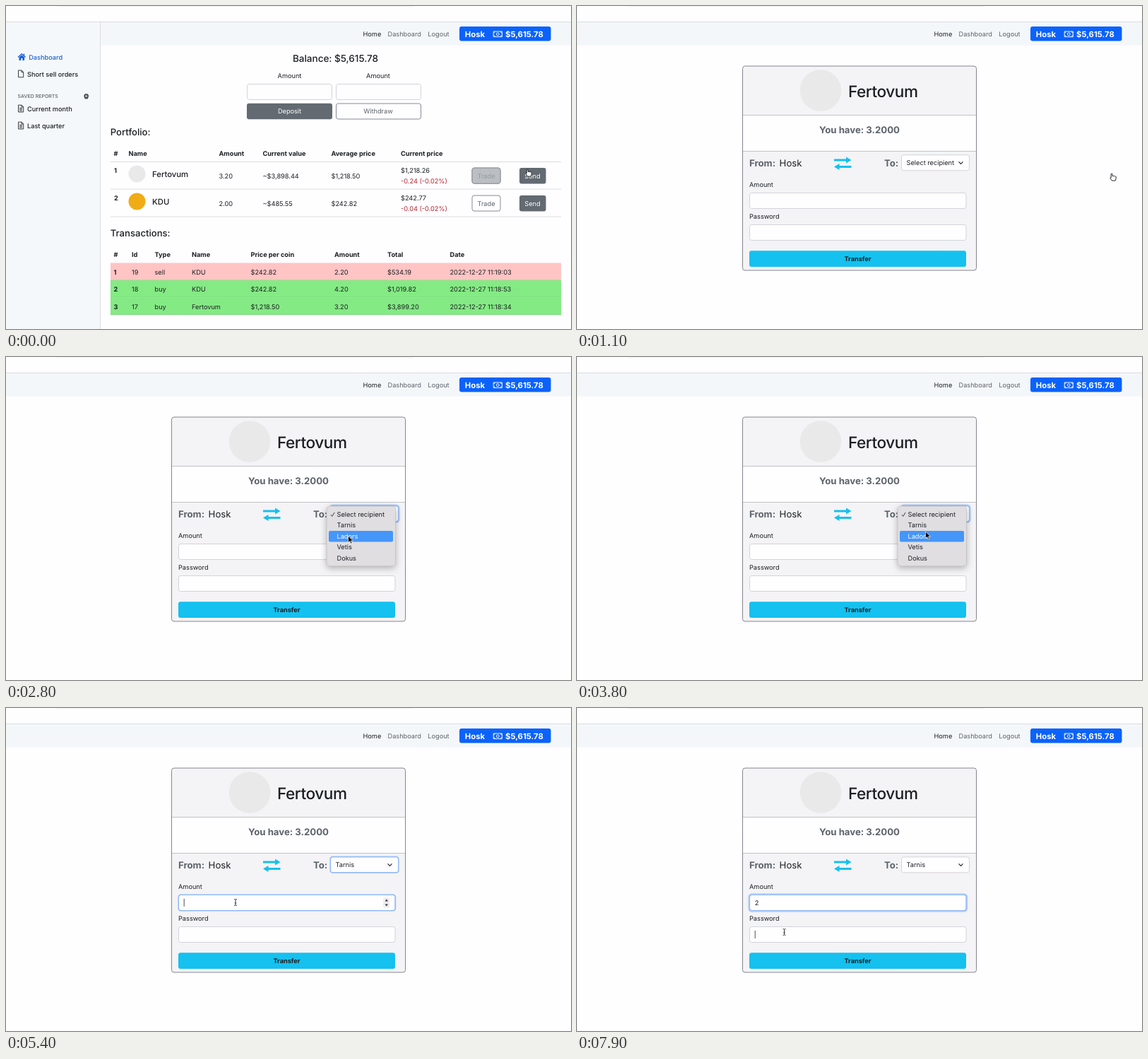
Recreate the animation shown at these times as an HTML page. Size 800 px wide and 457 px high, loop 8000 ms.

```html
<!DOCTYPE html>
<html lang="en">
<head>
<meta charset="utf-8">
<title>Wallet transfer</title>
<style>
  html, body { margin: 0; width: 800px; height: 457px; overflow: hidden; background: #fefdff; }
  svg { display: block; font: 9.2px Inter, sans-serif; fill: #1c1f23; text-rendering: geometricPrecision; }
  text { white-space: pre; }
  .b { font-weight: 700; }
  .m { font-weight: 500; }
  .mid { text-anchor: middle; }
  .h { font-size: 13.5px; font-weight: 500; }
  .h2 { font-size: 13.1px; font-weight: 500; }
  .coin { font-size: 11.3px; font-weight: 500; }
  .title { font-size: 22.6px; font-weight: 500; letter-spacing: -.02em; }
  .big { font-size: 13.2px; }
  .badge { font-size: 11.3px; font-weight: 700; }
  .tiny { font-size: 7px; font-weight: 500; }
  .status { font-size: 7.3px; }
  .grey { fill: #5c636a; }
  .white { fill: #fff; }
  .blue { fill: #1a62d4; }
  .red { fill: #b3242c; }
  .line { fill: none; stroke: #dcdde0; }
  .field { fill: #fefdff; stroke: #d3d5d9; }
  .solid { fill: #636a71; }
  .dark { fill: #495056; }
  .outline { fill: #fefdff; stroke: #858b91; }
  .icon { fill: none; stroke: #23272b; stroke-width: .9; }
  .ring { fill: none; stroke: #0d6efd; stroke-opacity: .28; stroke-width: 2.4; }
  .edge { fill: none; stroke: #8fb9f8; }
  .caret { fill: none; stroke: #222; stroke-width: .8; }
</style>
</head>
<body>
<svg id="stage" width="800" height="457" viewBox="0 0 800 457"></svg>
<script>
const LOOP = 8000, STEP = 100;
const user = 'Hosk', coinA = 'Fertovum', coinB = 'KDU';
const people = ['Tarnis', 'Ladors', 'Vetis', 'Dokus'];

const text = (x, y, s, c = '') => `<text x="${x}" y="${y}" class="${c}">${s}</text>`;
const box = (x, y, w, h, c, r = 3, more = '') =>
  `<rect x="${x}" y="${y}" width="${w}" height="${h}" rx="${r}" class="${c}" ${more}/>`;
const path = (d, c, more = '') => `<path d="${d}" class="${c}" ${more}/>`;
const disc = (x, y, r, fill) => `<circle cx="${x}" cy="${y}" r="${r}" fill="${fill}"/>`;
// Visible only inside the given time windows, "from-to" in ms
const at = (spans, s) => `<g data-on="${spans}">${s}</g>`;
const row = (xs, y, cells, c = '') => cells.map((s, i) => text(xs[i], y, s, c)).join('');

const file = (y, lined) => path(
  `M17.5 ${y}h4.6l2.6 2.6v7.2h-7.2zM22 ${y}v2.7h2.7` +
  (lined ? `M19 ${y + 4.2}h4M19 ${y + 6}h4M19 ${y + 7.8}h4` : ''), 'icon');

function header() {
  return path('M72 0H576', 'line', 'stroke-opacity=".8"') +
    box(0, 23, 800, 32.5, '', 0, 'fill="#f4f7fa"') + path('M0 22.5H800', 'line') +
    text(505.5, 43.3, 'Home') + text(540.5, 43.3, 'Dashboard', 'grey') +
    text(597.3, 43.3, 'Logout', 'grey') +
    box(642, 29, 129.5, 20.5, '', 3, 'fill="#0b62fb"') +
    text(649.8, 44, user, 'badge white') + text(707, 44, '$5,615.78', 'badge white') +
    path('M690.2 36h12.2v7.6h-12.2zM690.2 38.2q2 0 2-2.2M702.4 38.2q-2 0-2-2.2M690.2 41.4q2 0 2 2.2M702.4 41.4q-2 0-2 2.2',
      '', 'fill="none" stroke="#fff" stroke-width=".9"') +
    '<circle cx="696.3" cy="39.8" r="1.9" fill="none" stroke="#fff"/>';
}

function sidebar() {
  return box(0, 23, 133, 434, '', 0, 'fill="#f5f8fa"') + path('M133.5 23V457', 'line') +
    path('M17 72.4L22.3 67.6L27.6 72.4', '', 'fill="none" stroke="#1a62d4" stroke-width="1.4"') +
    path('M18.5 72.6L22.3 69.2L26.1 72.6V77H23.4V74H21.2V77H18.5zM24.8 67.5h1.4v3h-1.4z', 'blue') +
    text(32.2, 76, 'Dashboard', 'm blue') +
    file(91, false) + text(30, 100.2, 'Short sell orders', 'm') +
    text(16.6, 130, 'SAVED REPORTS', 'tiny grey') +
    '<circle cx="113.7" cy="127.4" r="2.5" class="icon" style="stroke-width:1.3"/>' +
    '<circle cx="113.7" cy="127.4" r="1" class="icon" style="stroke-width:.6"/>' +
    path('M111.2 130.9h5', 'icon') +
    file(140.2, true) + text(30, 149.2, 'Current month', 'm') +
    file(164.2, true) + text(30, 173, 'Last quarter', 'm');
}

function holding(y, n, coin, fill, cells, price, change) {
  return text(153, y + 15.5, n, 'b') + disc(185.5, y + 17.2, 12, fill) +
    text(207, y + 21.6, coin, 'coin') + row([301.5, 363.5, 460.5], y + 23.5, cells) +
    text(559, y + 15.7, price) + text(559, y + 30.2, change, 'red') +
    box(660, y + 8.8, 40, 22, 'outline') + text(680, y + 23.4, 'Trade', 'mid grey') +
    box(727, y + 8.6, 37.5, 22.6, 'solid') + text(745.5, y + 23.4, 'Send', 'mid white') +
    path(`M148 ${y + 38.8}H786`, 'line');
}

function dashboard() {
  const cols = [152.6, 178, 210.5, 263, 346.5, 465, 540, 628.5];
  const deals = [
    ['1', '19', 'sell', coinB, '$242.82', '2.20', '$534.19', '2022-12-27 11:19:03'],
    ['2', '18', 'buy', coinB, '$242.82', '4.20', '$1,019.82', '2022-12-27 11:18:53'],
    ['3', '17', 'buy', coinA, '$1,218.50', '3.20', '$3,899.20', '2022-12-27 11:18:34']
  ];
  return sidebar() + text(466.5, 79, 'Balance: $5,615.78', 'h mid') +
    text(401.5, 102.3, 'Amount', 'mid') + text(527, 102.3, 'Amount', 'mid') +
    box(341.5, 110.5, 120, 22, 'field') + box(467.5, 110.5, 120, 22, 'field') +
    box(341, 137.7, 121, 22.6, 'solid') + text(401.5, 152.4, 'Deposit', 'mid white') +
    box(467.5, 138, 120, 22, 'outline') + text(527, 152.4, 'Withdraw', 'mid grey') +
    text(147.8, 183.2, 'Portfolio:', 'h2') +
    row([152.6, 173.5, 301.5, 363.5, 460.5, 559], 212,
      ['#', 'Name', 'Amount', 'Current value', 'Average price', 'Current price'], 'b') +
    path('M148 220.5H786', 'line') +
    holding(220.3, '1', coinA, '#e9e9ea', ['3.20', '~$3,898.44', '$1,218.50'], '$1,218.26', '-0.24 (-0.02%)') +
    holding(259.3, '2', coinB, '#f0ac16', ['2.00', '~$485.55', '$242.82'], '$242.77', '-0.04 (-0.02%)') +
    at('0-100', box(660, 229.1, 40, 22, '', 3, 'fill="#bbbfc3" stroke="#8b9197"') +
      text(680, 243.7, 'Trade', 'mid', ) .replace('class="mid"', 'class="mid" fill="#959a9f"')) +
    at('100-1000', box(727, 228.9, 37.5, 22.6, 'dark') + text(745.5, 243.7, 'Send', 'mid white')) +
    text(147.8, 326.4, 'Transactions:', 'h2') +
    row(cols, 355, ['#', 'Id', 'Type', 'Name', 'Price per coin', 'Amount', 'Total', 'Date'], 'b') +
    deals.map((d, i) => {
      const y = 363.5 + i * 24.5;
      return box(148, y, 638, 24.5, '', 0, `fill="${i ? '#84ea84' : '#ffc4c4'}"`) +
        path(`M148 ${y + 24}H786`, '', `stroke="${i ? '#79d67b' : '#e3b9b4'}" stroke-width=".8"`) +
        text(cols[0], y + 16, d[0], 'b') + row(cols.slice(1), y + 16, d.slice(1));
    }).join('') +
    at('300-1000', path('M0 444.5H117.5Q121 444.5 121 448V457H0Z', '',
      'fill="#dfe1e4" stroke="#b9bbbe" stroke-width=".8"') +
      text(3, 453.6, 'tidalhill:4100/unit/3058/dispatch', 'status'));
}

function focus(y, x, w, full, half) {
  return at(full, box(x - 1, y - 1, w + 2, 24, 'ring', 4) + box(x, y, w, 22, 'edge')) +
    at(half, box(x - .5, y - .5, w + 1, 23, 'ring', 3.5, 'style="stroke-width:1.6"') + box(x, y, w, 22, 'edge'));
}

function menu() {
  const spans = ['2200-2400', '2400-2500 4000-4200', '2500-4000'];
  const items = ['Select recipient', ...people];
  return box(454, 211, 97.5, 84.8, '', 4.5,
    'fill="#e0dee1" stroke="#bab9bc" stroke-width=".6" style="filter:drop-shadow(0 3px 5px #0004)"') +
    items.map((s, i) => text(468.5, 225.8 + i * 15.5, s)).join('') +
    path('M460 223.2l1.7 2.2 3.4-5.4', 'icon') +
    spans.map((span, i) => at(span, box(457, 215 + i * 15.5, 91, 15.5, '', 2, 'fill="#4596f9"') +
      text(468.5, 225.8 + i * 15.5, items[i], 'white') +
      (i ? '' : path('M460 223.2l1.7 2.2 3.4-5.4', 'icon', 'style="stroke:#fff"')))).join('');
}

function transfer() {
  return box(234.5, 85, 331, 289, '', 3.5, 'fill="#f4f3f5"') +
    box(235, 154.5, 330, 51, '', 0, 'fill="#fefdff"') +
    path('M235 154.5H565M235 205.5H565', '', 'stroke="#c3c4c7"') +
    box(234.5, 85, 331, 289, '', 3.5, 'fill="none" stroke="#85878b"') +
    disc(345, 119.5, 29.3, '#e9e9ea') + text(384, 128.8, coinA, 'title') +
    text(400, 180.4, 'You have: 3.2000', 'big b grey mid') +
    text(244, 226.5, 'From:', 'big b grey') + text(286.6, 226.5, user, 'big') +
    text(435, 226.5, 'To:', 'big b grey') +
    path('M364 216.4H381V213.4L388.5 217.9L381 222.4V219.4H364ZM388.5 225.9H371.5V222.9L364 227.4L371.5 231.9V228.9H388.5Z',
      '', 'fill="#14c1ee"') +
    box(459.5, 210.8, 96, 22, 'field') + path('M540.5 220.4l3 3 3-3', 'icon', 'style="stroke-width:1.2"') +
    at('1000-4200', text(466.6, 225.2, 'Select recipient')) +
    at('4200-8000', text(466.6, 225.2, people[0])) +
    focus(210.8, 459.5, 96, '2200-5400', '5400-5500') +
    text(244, 256, 'Amount') + box(244.5, 264.5, 306.5, 22, 'field') +
    focus(264.5, 244.5, 306.5, '5500-8000', '5400-5500') +
    at('5000-7900', box(534, 268.5, 9.5, 14, '', 2, 'fill="#eeeef0"') +
      path('M536.6 273.6l2.2-3 2.2 3zM536.6 277.4l2.2 3 2.2-3z', '', 'fill="#33363a"')) +
    at('6400-8000', text(251.8, 278.8, '2')) +
    at('5400-5900', path('M252.2 269.8v11', 'caret')) +
    at('6400-6900 7400-7900', path('M258.6 269.8v11', 'caret')) +
    text(244, 301.3, 'Password') + box(244.5, 309.5, 306.5, 22, 'field') +
    at('7900-8000', path('M252.2 315v11', 'caret')) +
    box(244, 346.3, 307, 22.6, '', 3, 'fill="#14c1ef"') + text(397.5, 361, 'Transfer', 'b mid') +
    at('2200-4200', menu());
}

function pointer() {
  return '<g id="pointer">' +
    at('0-1400', path('M-2.8-4.4q.9-1.3 1.9 0v3q.8-.7 1.7.1.8-.6 1.6.2 1.3-.4 1.8.8v2.2l-1 3.2h-4.6l-2.7-3.6q0-1.4 1.3-.5z',
      '', 'fill="#fff" stroke="#111" stroke-width=".9"')) +
    at('1400-5000 7000-7600', path('M0 0V9.6L2.2 7.6L3.8 11L5.4 10.3L3.9 7H6.9Z', '',
      'fill="#000" stroke="#fff" stroke-width=".7"')) +
    at('5000-6400 6700-7000 7600-8000',
      path('M-1.9-4.5Q0-4.5 0-3.5V3.5Q0 4.5-1.9 4.5M1.9-4.5Q0-4.5 0-3.5M0 3.5Q0 4.5 1.9 4.5M-1.2.9h2.4', 'icon')) + '</g>';
}

const stage = document.getElementById('stage');
stage.innerHTML = header() + at('0-1000', dashboard()) + at('1000-8000', transfer()) + pointer();

const mark = document.getElementById('pointer');
const parts = [...stage.querySelectorAll('[data-on]')].map(el =>
  ({ el, spans: el.dataset.on.split(' ').map(s => s.split('-').map(Number)) }));

// Pointer stops: time, x, y
const stops = [
  [0, 740, 236], [600, 759, 242], [1300, 759, 242], [2000, 505, 221], [2300, 505, 221],
  [2800, 484.5, 253], [3100, 486, 258], [3200, 486, 258], [3800, 493.5, 247], [4100, 495, 240],
  [4300, 495, 240], [5200, 325, 275], [6600, 325, 275], [7200, 303, 302], [7300, 303, 302],
  [7800, 293.5, 317], [LOOP, 293.5, 317]
];

function draw(time) {
  const t = Math.floor(time % LOOP / STEP) * STEP;
  for (const { el, spans } of parts)
    el.style.display = spans.some(([a, b]) => t >= a && t < b) ? '' : 'none';
  const i = stops.findIndex(s => s[0] > t);
  const [t0, x0, y0] = stops[i - 1], [t1, x1, y1] = stops[i];
  const p = (t - t0) / (t1 - t0), k = p * p * (3 - 2 * p);
  mark.setAttribute('transform', `translate(${x0 + (x1 - x0) * k} ${y0 + (y1 - y0) * k})`);
}

const start = performance.now();
function tick() {
  draw(performance.now() - start);
  requestAnimationFrame(tick);
}
tick();
</script>
</body>
</html>
```
